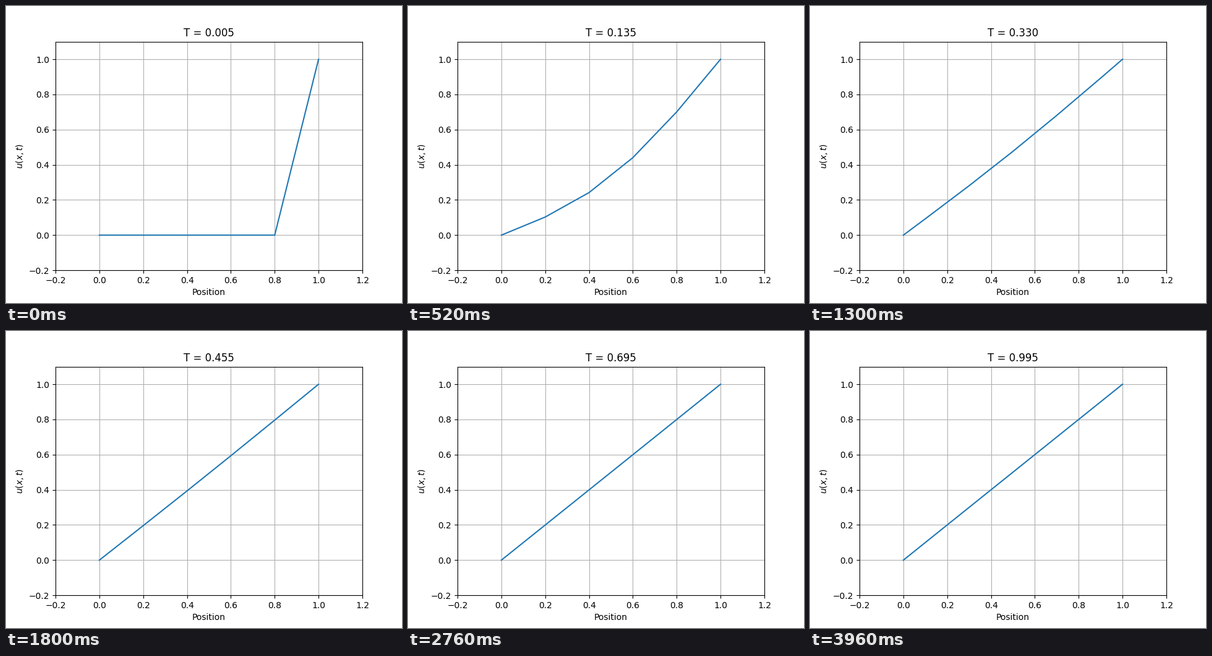
These frames come from a looping animation (640 px wide and 480 px high, 3.98 s). A matplotlib script:

```python
import numpy as np
import matplotlib.pyplot as plt
from matplotlib.animation import FuncAnimation

STEPS = 199
DX, DT = 0.1, 0.005
R = DT / DX**2

# Explicit heat equation on a rod: cold left end, right end held at 1
x = np.linspace(0, 1, 11)
u = np.zeros((STEPS + 1, x.size))
u[:, -1] = 1
for k in range(STEPS):
    u[k + 1, 1:-1] = u[k, 1:-1] + R * (u[k, 2:] - 2 * u[k, 1:-1] + u[k, :-2])

fig, ax = plt.subplots(figsize=(6.4, 4.8), dpi=100)
ax.set_xlim(-0.2, 1.2)
ax.set_ylim(-0.2, 1.1)
ax.set_xlabel("Position")
ax.set_ylabel("$u(x,t)$")
ax.grid(True)
line, = ax.plot(x, u[1], lw=1.5, color="tab:blue")
title = ax.set_title("")


def update(i):
    step = i + 1
    line.set_ydata(u[step])
    title.set_text(f"T = {step * DT:.3f}")
    return line, title


anim = FuncAnimation(fig, update, frames=STEPS, interval=20,
                     repeat=True, repeat_delay=0, blit=False)
plt.show()
```
